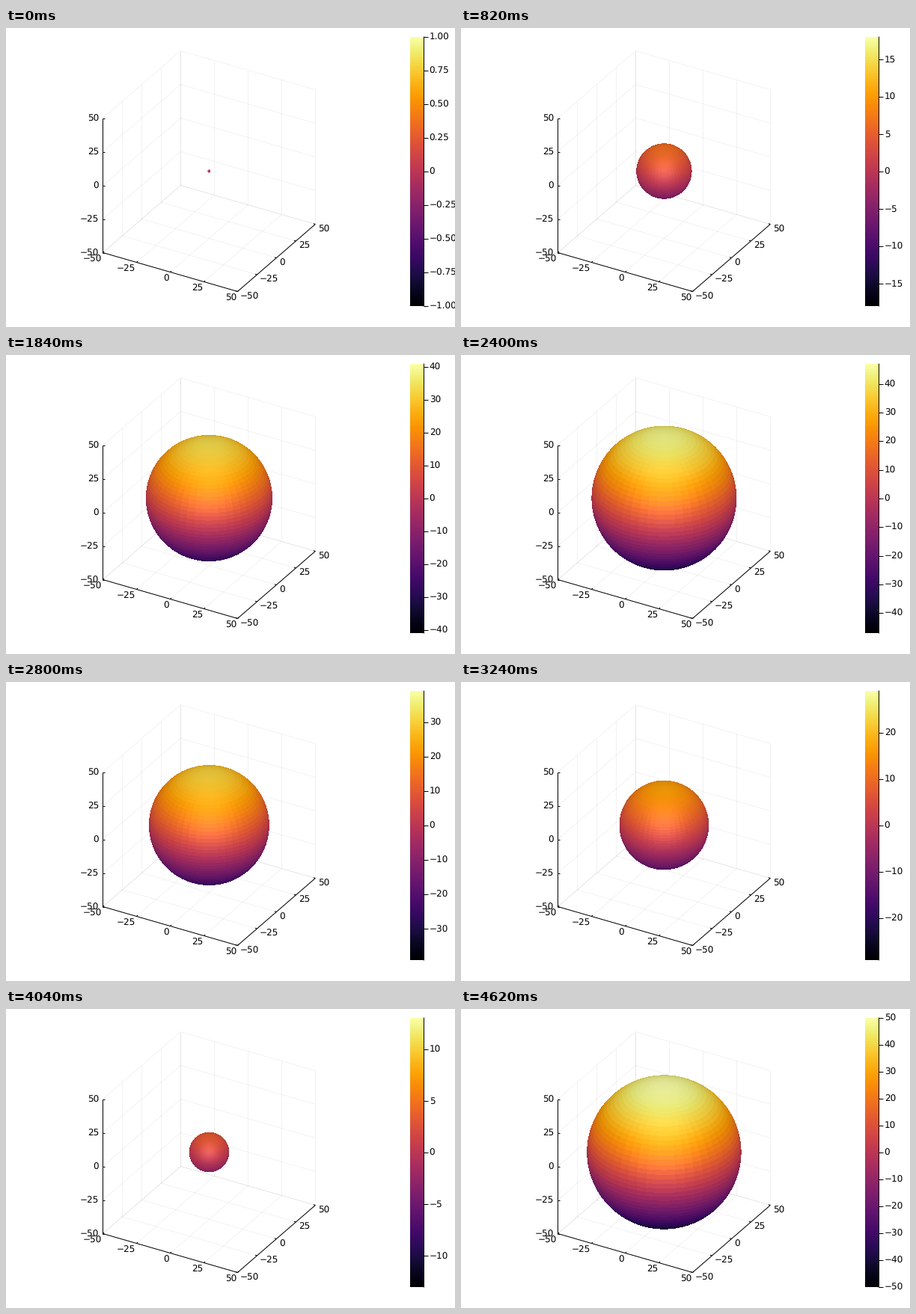
Recreate the animation shown at these times as a matplotlib script. Size 600x400 px, loop 4640 ms.

```python
import math

import matplotlib
import matplotlib.pyplot as plt
import numpy as np
from matplotlib.animation import FuncAnimation

W, H, DPI = 600, 400, 100
PX = 72 / DPI                  # one pixel in points
FONT = 12 * PX
TICK_MS, TICKS = 20, 232

UNIT = 2.0785                  # pixels per data unit
SPHERE_UNIT = 2.063            # a faceted ball is slightly smaller
CX, CY = 271.4, 191.5          # screen position of the origin
C30, S30 = math.cos(math.pi / 6), 0.5
RIGHT = np.array([C30, S30, 0])
UP = np.array([-S30 * S30, S30 * C30, C30])
TOWARD = np.array([S30 * C30, -C30 * C30, S30])

BAR_X, BAR_W, BAR_TOP, BAR_H = 540, 18, 12, 360
N_LAT, N_LON = 49, 49
INFERNO = matplotlib.colormaps["inferno"]

plt.rcParams["text.hinting"] = "no_hinting"
fig = plt.figure(figsize=(W / DPI, H / DPI), dpi=DPI, facecolor="white")
ax = fig.add_axes([0, 0, 1, 1])


def project(*point):
    p = np.array(point, float)
    return CX + UNIT * (RIGHT @ p), CY - UNIT * (UP @ p)


def line(p, q, **style):
    ax.plot(*zip(p, q), lw=PX, solid_capstyle="butt", **style)


def label(x, y, text="", ha="left"):
    return ax.text(x, y + 4.4, text, fontsize=FONT, family="DejaVu Sans",
                   ha=ha, va="baseline", color="black", zorder=5)


def number(v, decimals=0):
    return "0" if v == 0 else f"{v:.{decimals}f}".replace("-", "\u2212")


def draw_box():
    marks = (-50, -25, 0, 25, 50)
    grid = dict(color="black", alpha=0.05, zorder=1)
    for m in marks:
        for a, b in (
            ((m, -50, -50), (m, 50, -50)), ((-50, m, -50), (50, m, -50)),
            ((-50, m, -50), (-50, m, 50)), ((-50, -50, m), (-50, 50, m)),
            ((m, 50, -50), (m, 50, 50)), ((-50, 50, m), (50, 50, m)),
        ):
            line(project(*a), project(*b), **grid)

    ink = dict(color="black", zorder=4)
    corner, right = project(-50, -50, -50), project(50, -50, -50)
    line(corner, right, **ink)
    line(right, project(50, 50, -50), **ink)
    line(corner, project(-50, -50, 50), **ink)
    for m in marks:
        x, y = project(m, -50, -50)
        line((x, y), project(m, -48.4, -50), **ink)
        label(x - 1.2, y + 7.5, number(m), "right")
        x, y = project(50, m, -50)
        line((x, y), project(48.6, m, -50), **ink)
        label(x + 3.4, y + 5.5, number(m))
        x, y = project(-50, -50, m)
        line((x, y), (x + 2.2, y), **ink)
        label(x - 5.5, y + 0.4, number(m), "right")


def draw_bar():
    ramp = np.linspace(1, 0, 256)[:, None]
    ax.imshow(INFERNO(ramp), aspect="auto", interpolation="nearest",
              extent=(BAR_X, BAR_X + BAR_W, BAR_TOP + BAR_H, BAR_TOP))
    x = BAR_X + BAR_W
    line((x, BAR_TOP - 1), (x, BAR_TOP + BAR_H), color="black", zorder=4)


def tick_step(r):
    exponent = math.log10(2 * r)
    whole = math.floor(exponent)
    factor = 10 ** (exponent - whole)
    base = 2 if factor > 5 else 1 if factor > 2.5 else 0.5 if factor > 1 else 0.2
    return base * 10 ** whole / 2


# Pixel centres of the area that the largest sphere covers
X0, X1, Y0, Y1 = 164, 380, 84, 300
PXS, PYS = np.meshgrid(np.arange(X0, X1) + 0.5, np.arange(Y0, Y1) + 0.5)


def sphere_image(r):
    a = (PXS - CX) / (r * SPHERE_UNIT)
    b = (CY - PYS) / (r * SPHERE_UNIT)
    inside = a * a + b * b < 1
    a, b = a[inside], b[inside]
    c = np.sqrt(1 - a * a - b * b)
    x, y, z = (a * RIGHT[i] + b * UP[i] + c * TOWARD[i] for i in range(3))

    # Flat facets: snap to the middle of each latitude/longitude cell
    d_lat, d_lon = math.pi / N_LAT, 2 * math.pi / N_LON
    lat = (np.floor(np.arccos(np.clip(z, -1, 1)) / d_lat) + 0.5) * d_lat
    lon = (np.floor(np.arctan2(y, x) / d_lon) + 0.5) * d_lon
    z = np.cos(lat)
    facing = (np.sin(lat) * (np.cos(lon) * TOWARD[0] + np.sin(lon) * TOWARD[1])
              + z * TOWARD[2]).clip(0, 1)[:, None]

    rgb = INFERNO(0.5 + r * z / 100)[:, :3]
    rgb = rgb * (0.82 + 0.18 * facing) + 0.11 * facing ** 10
    image = np.zeros(PXS.shape + (4,))
    image[inside, :3] = rgb.clip(0, 1)
    image[inside, 3] = 1
    return image


draw_box()
draw_bar()
sphere = ax.imshow(sphere_image(1), extent=(X0, X1, Y1, Y0), aspect="auto",
                   interpolation="nearest", zorder=3)
bar_ticks, = ax.plot([], [], color="black", lw=PX, zorder=4,
                     solid_capstyle="butt")
bar_labels = [label(BAR_X + BAR_W + 7.7, 0) for _ in range(13)]
ax.set_xlim(0, W)
ax.set_ylim(H, 0)
ax.axis("off")


def radius(tick):
    # Three poses per 140 ms, held for 20, 100 and 20 ms
    group, slot = divmod(tick, 7)
    pose = 3 * group + (slot > 0) + (slot == 6)
    if pose < 50:
        return pose + 1
    return 99 - pose or 50


def update(tick):
    r = radius(tick)
    sphere.set_data(sphere_image(r))

    step = tick_step(r)
    decimals = next(d for d in range(4) if abs(step - round(step, d)) < 1e-9)
    n = math.floor(r / step + 1e-9)
    values = [i * step for i in range(-n, n + 1)]
    xs, ys = [], []
    for text in bar_labels:
        text.set_text("")
    for text, v in zip(bar_labels, values):
        y = BAR_TOP + BAR_H / 2 * (1 - v / r)
        xs += [BAR_X + BAR_W, BAR_X + BAR_W + 6, math.nan]
        ys += [y, y, math.nan]
        text.set_y(y + 3.9)
        text.set_text(number(v, decimals))
    bar_ticks.set_data(xs, ys)
    return [sphere, bar_ticks, *bar_labels]


anim = FuncAnimation(fig, update, frames=TICKS, interval=TICK_MS,
                     init_func=lambda: update(0), repeat=True,
                     repeat_delay=0, blit=False)
plt.show()
```
